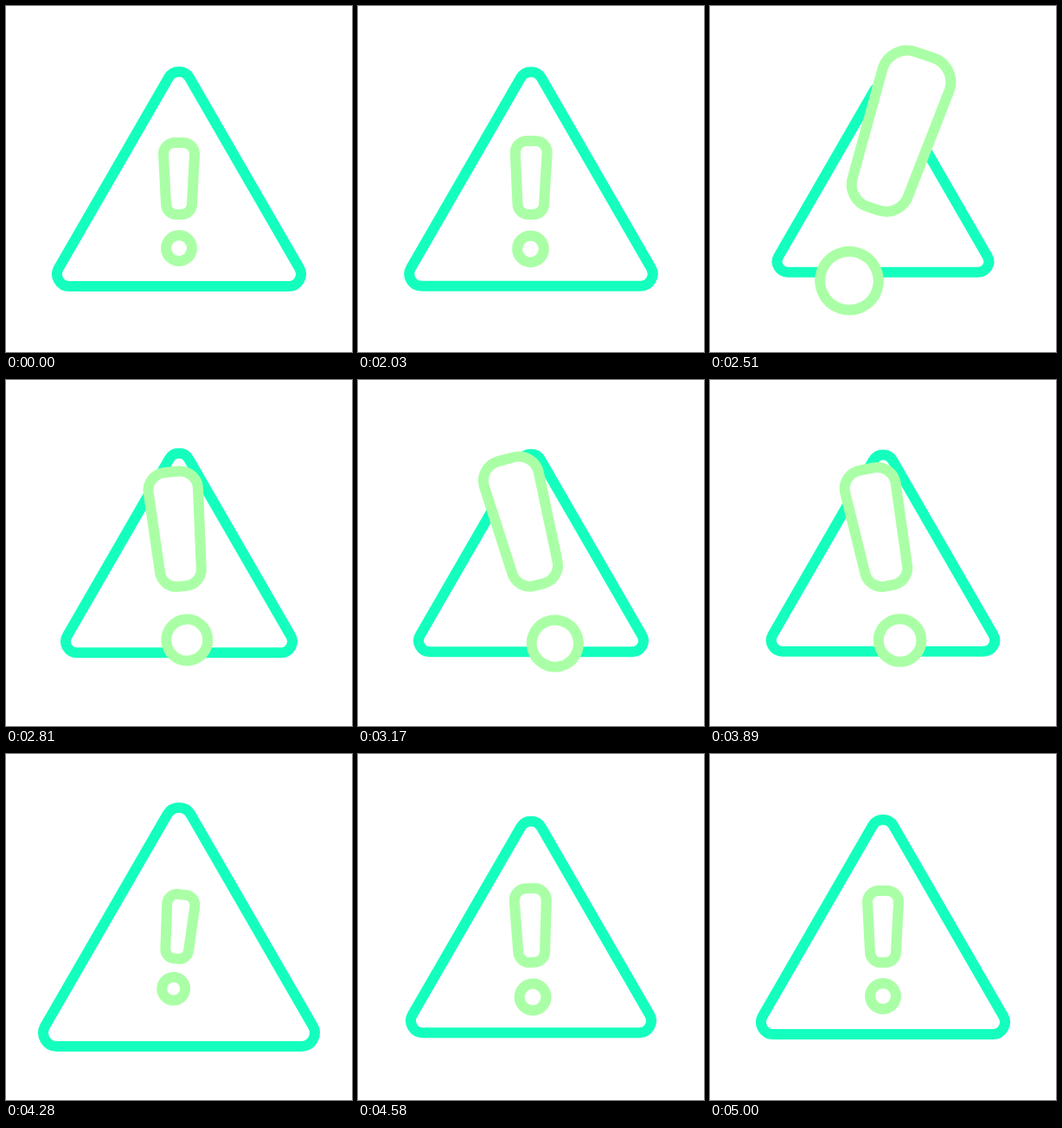
An HTML page for the animation above (5030 ms loop, 400 by 400 pixels).

```html
<!DOCTYPE html>
<html lang="en">
<meta charset="utf-8">
<title>Warning sign</title>
<style>
  html, body { margin: 0; width: 100%; height: 100%; overflow: hidden; background: #fff }
  svg { display: block; width: 100%; height: 100% }
  path, circle { fill: #fff; stroke-width: 12; vector-effect: non-scaling-stroke }
  #sign { stroke: #14ffbe }
  #mark { stroke: #aaffa6 }
</style>
<svg viewBox="-200 -200 400 400">
  <path id="sign" d="M-127 124A14 14 0 0 1-139.1 103L-12.1-117A14 14 0 0 1 12.1-117L139.1 103A14 14 0 0 1 127 124Z"/>
  <g id="mark">
    <path d="M-5-42H5A13 13 0 0 1 18-29L15 29A12 12 0 0 1 3 41H-3A12 12 0 0 1-15 29L-18-29A13 13 0 0 1-5-42Z"/>
    <circle cy="80" r="15"/>
  </g>
</svg>
<script>
const LOOP = 5030;
// Each track is a list of [time in ms, value], eased in and out between stops.
const signScale = [[2000, 1], [2400, .86], [3000, .95], [3660, .78], [4200, 1.128], [4600, .985], [5000, 1]];
const markScale = [[2000, 1], [2400, 2.36], [2900, 1.53], [3600, 2.36], [4200, .88], [4600, 1.03], [5000, 1]];
const markTurn = [[2000, 0], [2400, 21.5], [3000, -13.5], [3660, -21.8], [4200, 5.8], [4600, -1.5], [5000, 0]];

function valueAt(track, t) {
  const next = track.findIndex(stop => stop[0] > t);
  if (next < 0) return track[track.length - 1][1];
  if (!next) return track[0][1];
  const [t0, a] = track[next - 1], [t1, b] = track[next];
  const u = (t - t0) / (t1 - t0);
  return a + (b - a) * u * u * (3 - 2 * u);
}

const sign = document.getElementById('sign');
const mark = document.getElementById('mark');
const start = performance.now();

function draw() {
  const t = (performance.now() - start) % LOOP;
  const size = valueAt(markScale, t);
  const lift = 45 * Math.max(0, size - 1);
  sign.setAttribute('transform', `scale(${valueAt(signScale, t)})`);
  mark.setAttribute('transform', `rotate(${valueAt(markTurn, t)}) translate(0 ${-lift}) scale(${size})`);
  requestAnimationFrame(draw);
}
draw();
</script>
</html>
```
